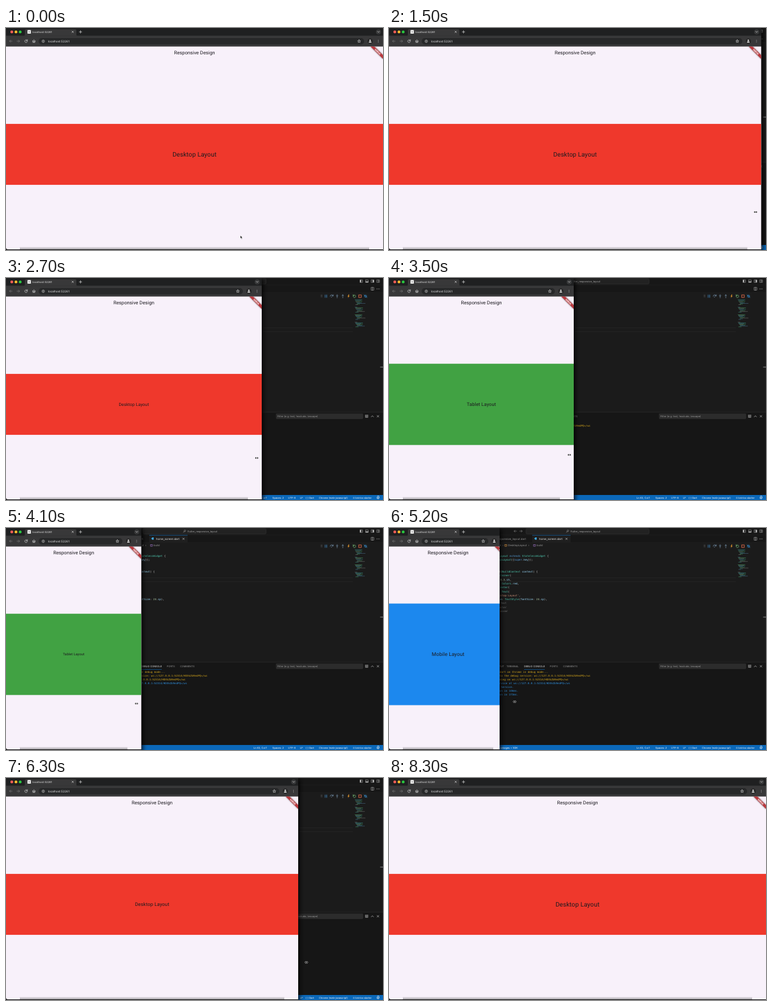
These frames come from a looping animation (600 px wide and 354 px high, 8.6 s). An HTML page:

```html
<!DOCTYPE html>
<html lang="en">
<head>
<meta charset="utf-8">
<title>Responsive layout</title>
<style>
  html, body { margin: 0; width: 100%; height: 100%; overflow: hidden; background: #181818; }
  #stage { display: block; width: 100vw; height: 100vh; }
  text { white-space: pre; text-rendering: geometricPrecision; font-family: Inter, sans-serif; }
  .mono { font-family: "DejaVu Sans Mono", monospace; }
  .app { font-family: Roboto, sans-serif; text-anchor: middle; }
  .line { fill: none; stroke-width: .7; stroke-linecap: round; stroke-linejoin: round; }
</style>
</head>
<body>
<svg id="stage" viewBox="0 0 600 354" preserveAspectRatio="none">
  <defs>
    <linearGradient id="dockShade" x2="0" y2="1">
      <stop offset="0" stop-color="#777" stop-opacity="0"/>
      <stop offset="1" stop-color="#777" stop-opacity=".65"/>
    </linearGradient>
    <filter id="soft" x="-30%" y="-100%" width="160%" height="300%"><feGaussianBlur stdDeviation="1"/></filter>
    <filter id="wide" x="-10%" y="-10%" width="120%" height="120%"><feGaussianBlur stdDeviation="3"/></filter>
  </defs>
  <g id="editor"></g>
  <rect id="shadow" x="-10" y="2" height="360" fill="#000" opacity=".75" filter="url(#wide)"/>
  <svg id="browser" height="354"></svg>
  <g id="cursor"></g>
</svg>
<script>
const LOOP = 8600;
const $ = id => document.getElementById(id);
const rect = (x, y, w, h, fill, more = '') =>
  `<rect x="${x}" y="${y}" width="${w}" height="${h}" fill="${fill}" ${more}/>`;
const dot = (x, y, r, fill, more = '') => `<circle cx="${x}" cy="${y}" r="${r}" fill="${fill}" ${more}/>`;
const line = (d, color, more = '') => `<path class="line" d="${d}" stroke="${color}" ${more}/>`;
const text = (x, y, size, fill, s, more = '') =>
  `<text x="${x}" y="${y}" font-size="${size}" fill="${fill}" ${more}>${s}</text>`;
const cross = (x, y, r, color) => line(`M${x - r} ${y - r}l${2 * r} ${2 * r}m0 ${-2 * r}l${-2 * r} ${2 * r}`, color);

// ---------- code editor behind the browser ----------
const code = `class DesktopLayout extends StatelessWidget {
  const DesktopLayout({super.key});

  @override
  Widget build(BuildContext context) {
    return Container(
      height: 0.3.sh,
      color:   Colors.red,
      child: Center(
        child: Text(
          'Desktop Layout',
          style: TextStyle(fontSize: 24.sp),
        ), // Text
      ), // Center
    ); // Container`.split('\n');

const tokenColors = [
  [/^\/\//, '#747474'], [/^'/, '#ce9178'], [/^\d/, '#b5cea8'],
  [/^(class|extends|const|super|return)$/, '#569cd6'],
  [/^[A-Z]/, '#4ec9b0'], [/^build$/, '#dcdcaa'], [/^[a-z]/, '#9cdcfe'],
];
const highlight = s => s.replace(/\/\/.*|'[^']*'|[\d.]*\d|\w+/g, token => {
  const rule = tokenColors.find(([pattern]) => pattern.test(token));
  return rule ? `<tspan fill="${rule[1]}">${token}</tspan>` : token;
});

const socket = 'ws://127.0.0.1:52314/HDXkZb9edPQ=/ws';
const consoleLines = [
  'Launching lib/main.dart on Chrome in debug mode...',
  'This app is linked to the debug service: ' + socket,
  'Debug service listening on ' + socket,
  'Connecting to VM Service at ' + socket,
  'Connected to the VM Service.',
  'Restarted application in 146ms.',
  'Restarted application in 173ms.',
];

function minimap() {
  const colors = ['#2f7f73', '#40627a', '#3d8a55', '#666'];
  let out = '';
  for (let block = 0; block < 4; block++)
    for (let i = 0; i < 8; i++) {
      const indent = [0, 1, 1, 2, 3, 4, 3, 1][i];
      const length = [12, 9, 11, 6, 8, 13, 5, 4][(i + (block % 2) * 7) % 8];
      out += rect(555 + indent, 34.5 + block * 11.8 + i * 1.1, length, .6, colors[(i + block) % 4]);
    }
  return out;
}

function layoutIcons() {
  const bars = [[0, 0, 2, 4], [0, 2.5, 4.4, 1.5], [2.4, 0, 2, 4], [2.4, 0, .7, 4]];
  return bars.map(([x, y, w, h], i) => {
    const left = 563.3 + i * 8.9;
    return rect(left, 3, 4.4, 4, 'none', 'stroke="#bbb" stroke-width=".5"') + rect(left + x, 3 + y, w, h, '#bbb');
  }).join('');
}

const debugBar =
  rect(498, 24, 80, 9.5, '#1c1c1c', 'rx="1.5"') +
  [0, 1.5, 3].map(y => dot(501.5, 27 + y, .4, '#888') + dot(503, 27 + y, .4, '#888')).join('') +
  line('M508 27v4m2.4 0v-4', '#4aa3e8') +
  line('M516 29a2.3 2.3 0 0 1 4.5-.5m.3-1.8v2h-2', '#7d9db8') + dot(518, 30.5, .6, '#7d9db8') +
  line('M527 26.5v3m-1.3-1.2l1.3 1.2 1.3-1.2', '#7d9db8') + dot(527, 31.2, .6, '#7d9db8') +
  line('M536 29.8v-3m-1.3 1.2l1.3-1.2 1.3 1.2', '#7d9db8') + dot(536, 31.2, .6, '#7d9db8') +
  '<path d="M545.6 26l-2 3.4h1.4l-.8 2.5 2.6-3.4h-1.5l1-2.5z" fill="#f0a030"/>' +
  line('M552.7 28a2.1 2.1 0 1 1-.3 1.5m0-2.8v1.6h1.6', '#7fc77f') +
  rect(561.3, 27, 4, 4, 'none', 'stroke="#f0704c" stroke-width=".8"') +
  dot(572.3, 29, 1.7, 'none', 'stroke="#3b9ae0" stroke-width=".7"') +
  line('M570 27l4.5 4', '#3b9ae0');

$('editor').innerHTML =
  rect(0, 0, 600, 354, '#1b1b1b') + rect(0, 0, 600, 23, '#171717') +
  rect(0, 10.8, 600, .4, '#2b2b2b') + rect(0, 22.8, 600, .4, '#262626') +
  line('M203 5h-4m1.5-1.5L199 5l1.5 1.5M208 5h4m-1.5-1.5L212 5l-1.5 1.5', '#777') +
  rect(218, 1, 196, 8.5, '#222', 'rx="1.6" stroke="#3d3d3d" stroke-width=".4"') +
  dot(284.7, 4.5, 1.3, 'none', 'stroke="#aaa" stroke-width=".5"') + line('M283.8 5.5l-1.3 1.4', '#aaa') +
  text(289, 6.7, 4, '#aaa', 'flutter_responsive_layout') + layoutIcons() +
  text(218, 18.8, 4.3, '#999', 'responsive_layout.dart', 'text-anchor="end"') +
  rect(228, 11, 61, 12.2, '#1f1f1f') + rect(228, 11, 61, .5, '#0a78d4') +
  '<path d="M231 17l2-2h2v3.5l-1.5.5z" fill="#3ea6e0"/>' +
  text(239, 18.8, 4.35, '#eee', 'home_screen.dart') + cross(282.5, 17.3, 1.2, '#ccc') +
  rect(581, 15, 4.4, 4.4, 'none', 'stroke="#bbb" stroke-width=".5"') + line('M583.2 15v4.4', '#bbb') +
  [590, 592, 594].map(x => dot(x, 17.2, .5, '#bbb')).join('') +
  text(173.5, 29.2, 4, '#999', 'art  ›') + rect(184.5, 26.3, 3, 2.8, 'none', 'stroke="#e09a45" stroke-width=".6"') +
  text(189.5, 29.2, 4.2, '#999', 'DesktopLayout  ›') +
  rect(230, 26.3, 3, 2.8, 'none', 'stroke="#a77bd0" stroke-width=".6"') + text(235, 29.2, 4.2, '#999', 'build') +
  debugBar +
  rect(0, 79, 552, .4, '#303030') + rect(0, 85.3, 552, .4, '#303030') +
  code.map((s, i) => text(142, 45.9 + i * 6.29, 4.15, '#ccc', highlight(s), 'class="mono"')).join('') +
  rect(205.4, 87, 2.6, 2.6, '#f44336', 'visibility="hidden"') +
  minimap() + rect(595.5, 141.6, 4.5, .9, '#999') +
  // panel
  rect(0, 214, 600, 132, '#161616') + rect(0, 213.8, 600, .5, '#333') +
  [[167, 'OUTPUT'], [187, 'TERMINAL'], [215, 'DEBUG CONSOLE'], [256, 'PORTS'], [277, 'COMMENTS']].map(([x, s]) =>
    text(x, 221.9, 3.85, s[0] == 'D' ? '#eee' : '#999', s)).join('') +
  rect(215, 225.4, 33, .5, '#0a78d4') +
  rect(430, 216.4, 138, 8, '#2c2c2c', 'rx=".8" stroke="#3c3c3c" stroke-width=".4"') +
  text(432, 221.9, 4, '#999', 'Filter (e.g. text, !exclude, \\escape)') +
  rect(572, 218.7, 4, 3.6, 'none', 'stroke="#bbb" stroke-width=".5"') + line('M572.4 220h3m-3 1.2h3', '#bbb') +
  line('M581.3 221.5l1.8-1.9 1.8 1.9', '#bbb') + cross(592, 220.5, 1.4, '#bbb') +
  consoleLines.map((s, i) =>
    text(128.5, 231 + i * 5.95, 4.15, i < 3 ? '#d3a51c' : '#2f8fdc', s, 'class="mono"')).join('') +
  // status bar
  rect(0, 346, 600, 8, '#0b68b9') +
  text(205, 351.5, 3.95, '#fff', 'Debug my packages + SDK', 'text-anchor="end"') +
  [[394, 'Ln 63, Col 1'], [424, 'Spaces: 2'], [449, 'UTF-8'], [468, 'LF'], [477, '{ } Dart'],
   [498, 'Chrome (web-javascript)'], [552, '⊙ brinlox starter']].map(([x, s]) =>
    text(x, 351.5, 3.9, '#fff', s)).join('') +
  line('M590.5 351h3.6l-.6-.9v-1.4a1.2 1.2 0 0 0-2.4 0v1.4zm1.5 1h.6', '#fff');

// ---------- browser window ----------
const star = Array.from({ length: 10 }, (_, i) => {
  const r = i % 2 ? 1.1 : 2.5, a = i * Math.PI / 5;
  return `${(-38 + r * Math.sin(a)).toFixed(2)},${(21.2 - r * Math.cos(a)).toFixed(2)}`;
}).join(' ');

$('browser').innerHTML =
  rect(0, 0, 600, 354, '#111') + rect(0, 0, 600, 13, '#1f2021') +
  rect(0, 12.3, 600, 17.2, '#383839') +
  ['#fe5f57', '#febc2e', '#28c840'].map((c, i) => dot(9.2 + i * 6.7, 6.2, 2.2, c)).join('') +
  '<path d="M28 12.5q2 0 2-2V4q0-2 2-2h78q2 0 2 2v6.5q0 2 2 2z" fill="#383839"/>' +
  rect(34.2, 3.3, 5.4, 5.8, '#f4f4f4', 'rx=".6"') + dot(36.9, 6.2, 1, '#888') +
  text(42.3, 7.8, 4.2, '#e6e6e6', 'localhost:52261') + cross(106.2, 6.2, 1.2, '#ddd') +
  line('M116.6 6.2h4m-2-2v4', '#ddd') +
  line('M9.8 21H5.6m1.9-1.9L5.6 21l1.9 1.9M17.4 21h4.2m-1.9-1.9l1.9 1.9-1.9 1.9', '#777') +
  line('M33.8 20a2.1 2.1 0 1 0 .2 1.6m0-3v1.6h-1.6', '#ddd') +
  line('M42.2 21l2.2-2 2.2 2m-3.7-.5v2.6h1v-1.4h1v1.4h1v-2.6', '#ddd') +
  `<rect id="omnibox" x="52" y="16" height="10.2" rx="5.1" fill="#272829"/>` +
  dot(59.3, 21.1, 2, 'none', 'stroke="#ddd" stroke-width=".6"') + line('M59.3 21v1m0-2v0', '#ddd') +
  text(66.8, 22.8, 4.6, '#e6e6e6', 'localhost:52261') +
  '<g id="rightChrome">' +
    dot(-7.2, 6.2, 4, '#38393a') + line('M-8.6 5.6l1.4 1.4 1.4-1.4', '#ddd') +
    `<polygon class="line" points="${star}" stroke="#ddd" style="stroke-width:.6"/>` +
    dot(-20.5, 21, 4.3, '#262626') + dot(-20.5, 19.6, 1.2, '#eee') +
    '<path d="M-22.8 23.2q0-2 2.3-2t2.3 2z" fill="#eee"/>' +
    [19.2, 21, 22.8].map(y => dot(-7.4, y, .45, '#ddd')).join('') +
  '</g>' +
  rect(0, 29.5, 600, 323.5, '#f8f1fa') +
  '<rect id="box"/>' +
  text(0, 41.8, 7.72, '#1d1b20', 'Responsive Design', 'id="title" class="app"') +
  text(0, 0, 10, '#1d1b20', '', 'id="label" class="app" letter-spacing=".088"') +
  '<svg y="29.5" width="600" height="324" overflow="hidden"><g id="banner">' +
    rect(-14, 9.8, 28, 4.2, '#000', 'opacity=".6" filter="url(#soft)"') + rect(-14, 9.8, 28, 4.2, '#b93a3f') +
    text(0, 13.2, 3.6, '#fff', 'DEBUG', 'class="app" font-weight="900"') +
  '</g></svg>' +
  '<rect id="dock" x="22" y="348.5" height="4.5" fill="url(#dockShade)"/>' +
  '<path d="M0 350q0 3 3 3H0z" fill="#111"/>';

// ---------- motion ----------
const windowPath = [[1400, 600], [1700, 577], [2200, 502], [2700, 407], [3100, 347], [3500, 294],
  [4400, 176], [5100, 176], [5200, 188], [6300, 465], [6800, 600]];
const cursorPath = [[0, 373, 331], [100, 375, 330], [700, 596, 295], [1400, 596, 294], [2200, 495, 290],
  [2700, 399, 287], [3500, 287, 282], [4400, 168, 279], [4800, 150, 278], [5100, 180, 277],
  [5200, 200, 277], [6300, 478, 294], [6800, 597, 299], [7400, 597, 298], [8200, 280, -6]];

function along(path, t) {
  const next = path.findIndex(p => p[0] > t);
  if (next < 0) return path.at(-1).slice(1);
  if (next === 0) return path[0].slice(1);
  const a = path[next - 1], b = path[next], k = (t - a[0]) / (b[0] - a[0]);
  return a.slice(1).map((v, i) => v + (b[i + 1] - v) * k);
}

const layouts = [
  { upTo: 210, name: 'Mobile', color: '#1c88ee', height: 162, font: .0432 },
  { upTo: 386, name: 'Tablet', color: '#41a243', height: 129.6, font: .0258 },
  { upTo: 999, name: 'Desktop', color: '#ef382c', height: 97.2, font: 1 / 60 },
];
const arrow = '<path d="M0 0v4.6l1.1-1 .8 1.8.9-.4-.8-1.7h1.5z" fill="#111" stroke="#fff" stroke-width=".4"/>';
const resize = '<path d="M-2.8 0l1.9-1.9v1.3h1.8v-1.3L2.8 0 .9 1.9V.6H-.9v1.3z" fill="#111" stroke="#fff" stroke-width=".4"/>';

function set(id, attributes) {
  for (const name in attributes) $(id).setAttribute(name, attributes[name]);
}

function draw(t) {
  const [width] = along(windowPath, t);
  // the frame trails its content when it starts to grow
  const visible = t >= 5200 && t < 5300 ? 176 : width;
  const layout = layouts.find(l => width < l.upTo);
  const size = width * layout.font;

  set('browser', { width: visible });
  set('shadow', { width: visible + 13 });
  set('omnibox', { width: width - 82 });
  set('rightChrome', { transform: `translate(${width})` });
  set('banner', { transform: `translate(${width}) rotate(45)` });
  set('dock', { width: width - 44 });
  set('title', { x: width / 2 });
  set('box', { y: 201.5 - layout.height / 2, width, height: layout.height, fill: layout.color });
  set('label', { x: width / 2, y: 201.5 + size * .355, 'font-size': size });
  $('label').textContent = layout.name + ' Layout';

  const [x, y] = along(cursorPath, t);
  set('cursor', { transform: `translate(${x} ${y})` });
  $('cursor').innerHTML = t < 700 || t > 7400 ? arrow : resize;
}

function tick(now) {
  draw(Math.floor(now % LOOP / 100) * 100);
  requestAnimationFrame(tick);
}
requestAnimationFrame(tick);
</script>
</body>
</html>
```
